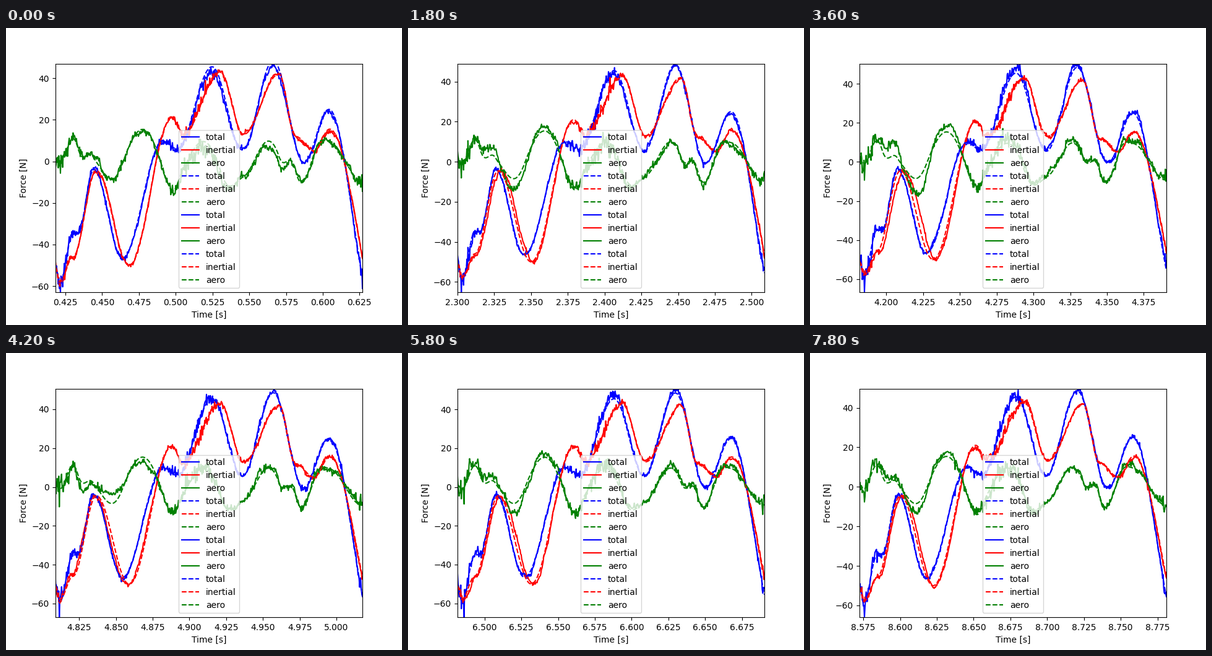
Animation, 640 px wide and 480 px high, one loop 8000 ms. Source, as a matplotlib script:

```python
import numpy as np
import matplotlib.pyplot as plt
from matplotlib.animation import FuncAnimation

FRAMES, INTERVAL = 40, 200
T0, PERIOD, SPAN = 0.41826, 0.20908, 0.2087
LEFT, RIGHT = 80, 576
NAMES = ("total", "inertial", "aero")
COLORS = ("blue", "red", "green")

# Turning points of the mean wing beat: (position across the axes, force)
TOTAL = [(80, -50), (87, -59), (108, -35), (116, -35), (142, -4), (188, -46.5),
         (254, 10), (276, 6), (333, 45.5), (382, 5.5), (432, 48.5), (481, -0.5),
         (522, 25), (596, -72)]
INERTIAL = [(80, -51), (87, -58), (108, -46), (146, -4.5), (199, -50), (268, 21),
            (286, 13), (346, 43), (384, 13), (441, 42), (468, 12), (498, 5),
            (523, 15.5), (612, -80)]

x = np.linspace(LEFT, RIGHT, 560)


def ease(points, at):
    """Curve that swings in half cosines from one turning point to the next."""
    px, py = np.array(points, float).T
    i = np.clip(np.searchsorted(px, at, side="right") - 1, 0, len(px) - 2)
    s = np.clip((at - px[i]) / (px[i + 1] - px[i]), 0, 1)
    return py[i] + (py[i + 1] - py[i]) * (1 - np.cos(np.pi * s)) / 2


def bump(center, width):
    return np.exp(-((x - center) / width) ** 2)


def noise(rng, rough):
    """Slow wander plus sample noise of the given size."""
    knots = np.arange(LEFT, RIGHT + 7, 7)
    wander = np.interp(x, knots, rng.normal(0, 0.7, len(knots)))
    return wander + rough * rng.normal(0, 1, x.size)


total_mean, inert_mean = ease(TOTAL, x), ease(INERTIAL, x)
rough_total = (0.65 + 2.0 * bump(88, 26) + 1.4 * bump(312, 32)
               + 0.5 * bump(268, 20) + 1.8 * bump(576, 9))
rough_inert = 0.5 + 0.6 * bump(84, 16) + 1.5 * bump(308, 30) + 0.6 * bump(572, 10)


def limits(k):
    drift = np.sin(np.pi * k / 52)
    return -63 - 4.3 * drift, 47 + 3.8 * drift


def beat(k):
    """Measured total and inertial force of beat k."""
    rng = np.random.default_rng(100 + k)
    # The inertial swing lags or leads early in the beat, in a ten-beat rhythm.
    lag = -6 * np.sin(2 * np.pi * k / 10) * bump(165, 65)
    low, high = limits(k)
    total = total_mean + noise(rng, rough_total)
    inert = ease(INERTIAL, x - lag) + noise(rng, rough_inert)
    total[total > 0] *= high / total.max()
    total[total.argmin()] = low
    return total, inert


fig, ax = plt.subplots(figsize=(6.4, 4.8), dpi=100)
lines = []
for _ in range(2):
    for style in ("-", "--"):
        for name, color in zip(NAMES, COLORS):
            lines += ax.plot([], [], style, color=color, label=name)
ax.set_xlabel("Time [s]")
ax.set_ylabel("Force [N]")
ax.legend(loc="lower center")


def draw(k):
    start = T0 + PERIOD * k
    t = start + SPAN * (x - LEFT) / (RIGHT - LEFT)
    total, inert = beat(k)
    curves = (total, inert, total - inert,
              total_mean, inert_mean, total_mean - inert_mean)
    for line, y in zip(lines, curves):
        line.set_data(t, y)
    ax.set_xlim(start, start + SPAN)
    ax.set_ylim(*limits(k))
    return lines


anim = FuncAnimation(fig, draw, frames=FRAMES, interval=INTERVAL,
                     repeat=True, repeat_delay=0, blit=False)
plt.show()
```
